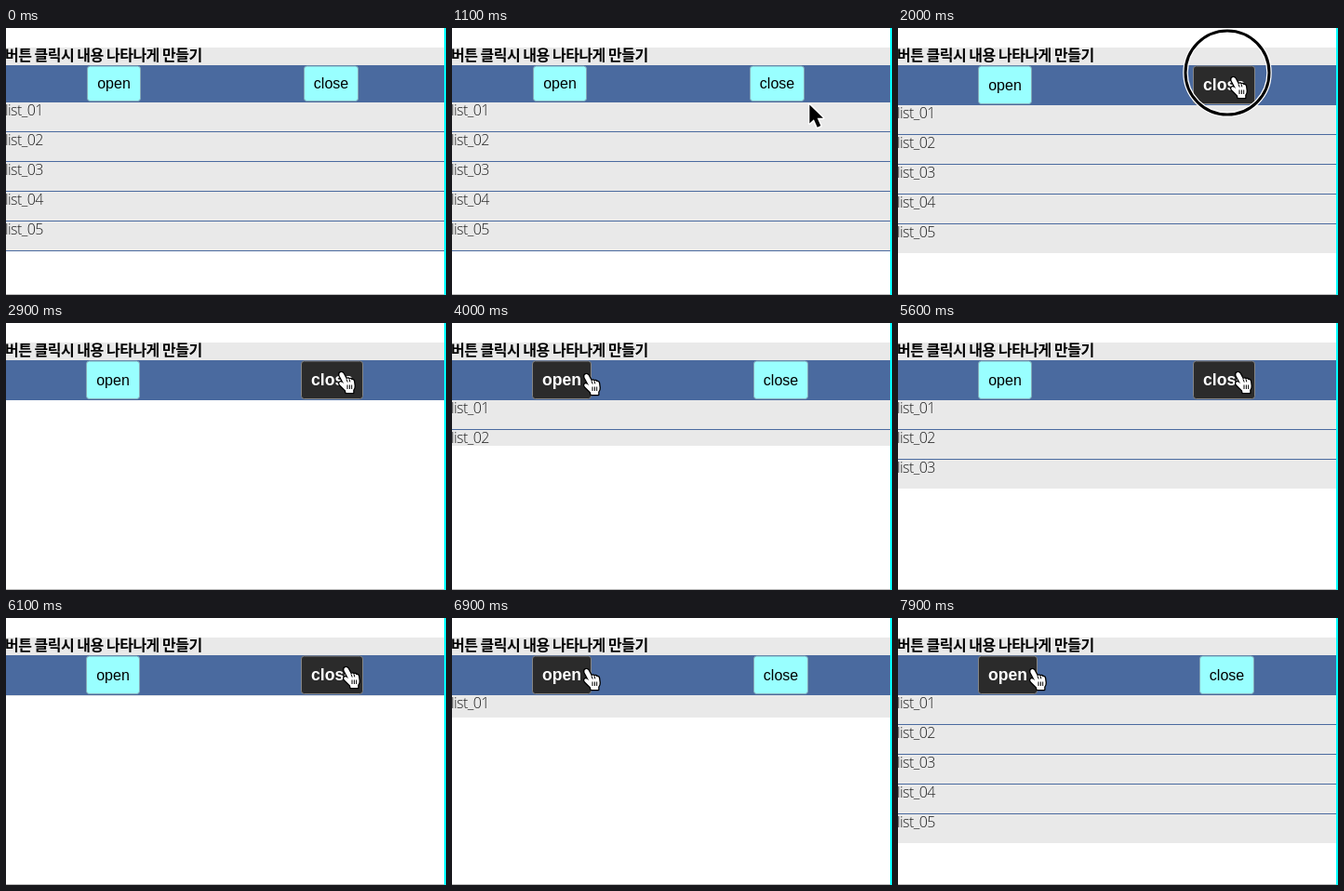
An HTML page with a canvas that plays this animation: 473x287 px, repeating every 9.4 s.

```html
<!DOCTYPE html>
<html lang="ko">
<head>
<meta charset="utf-8">
<style>
html, body { margin: 0; overflow: hidden; background: #fff; }
canvas { display: block; }
</style>
</head>
<body>
<canvas id="stage" width="473" height="287"></canvas>
<script>
const ctx = document.getElementById('stage').getContext('2d');
const LOOP = 9400, STEP = 100, SLIDE = 960;
const GREY = '#e9e9e9', BLUE = '#4a6a9f';

// Pointer positions: [time, x, y]
const path = [
  [100, 455, 183], [200, 440, 150], [640, 440, 150], [1400, 356, 48],
  [1550, 356, 48], [1700, 360, 53], [3150, 360, 53], [3550, 144, 55],
  [4350, 144, 55], [4800, 311, 36], [5080, 364, 52], [5300, 364, 52],
  [5500, 365, 53], [6150, 365, 53], [6600, 144, 55]
];
// List slides: [start, target height]
const slides = [[1965, 0], [3640, 159], [5181, 0], [6657, 159]];
const clickRings = [2000, 5200, 6700];

const arrow = new Path2D('M0 0V20L4.6 15.8L8.4 24.2L12 22.6L8.3 14.4H14.6Z');
const hand = new Path2D('M1.5 4.5Q.8 2 2.6 1.2Q4.6 .4 5.8 2.6L9 8.4Q10.4 6.8 12 8.4Q13.6 7.4 14.6 9.2Q16.8 8.6 17 11L17.6 15.5Q17.8 18 16.2 20V23H8.6L8 20.4L2 14.6Q.2 12 2.6 11.2Q4 11 6.2 13.2Z');
const knuckles = new Path2D('M10 14.5V19M12.4 14.5V19M14.7 14.5V19M9 8.4L10.2 11.6M12 8.4L12.8 11.4');

const swing = p => 0.5 - Math.cos(Math.PI * Math.min(1, Math.max(0, p))) / 2;

function pointerAt(t) {
  if (t < path[0][0]) return null;
  const next = path.findIndex(key => key[0] > t);
  if (next < 0) return path[path.length - 1].slice(1);
  const [t0, x0, y0] = path[next - 1], [t1, x1, y1] = path[next];
  const k = swing((t - t0) / (t1 - t0));
  return [x0 + (x1 - x0) * k, y0 + (y1 - y0) * k];
}

function listHeight(t) {
  let height = 160;
  for (const [start, target] of slides) height += (target - height) * swing((t - start) / SLIDE);
  return Math.round(height);
}

function rect(x, y, w, h, fill) {
  ctx.fillStyle = fill;
  ctx.fillRect(x, y, w, h);
}

function text(str, x, y, font, fill, spacing = 0) {
  ctx.font = font;
  ctx.letterSpacing = spacing + 'px';
  ctx.fillStyle = fill;
  ctx.fillText(str, x, y);
}

function button(label, x, width, height, active) {
  ctx.beginPath();
  ctx.roundRect(x + 0.5, 41.5 - 0.5, width - 1, height - 2.5, 3);
  ctx.fillStyle = active ? '#2b2b2b' : '#9ff';
  ctx.fill();
  ctx.strokeStyle = active ? '#858585' : '#84a9b8';
  ctx.lineWidth = 1;
  ctx.stroke();
  const font = (active ? 'bold 17.6px' : '16px') + ' "Liberation Sans", Arial, sans-serif';
  ctx.textAlign = 'center';
  text(label, x + width / 2, height > 40 ? 67 : 65, font, active ? '#fff' : '#000');
  ctx.textAlign = 'left';
}

function list(top, height) {
  ctx.save();
  ctx.beginPath();
  ctx.rect(0, top, 473, height);
  ctx.clip();
  for (let i = 0; i < 5; i++) {
    const y = top + i * 32;
    rect(0, y, 473, 31, GREY);
    rect(0, y + 31, 473, 1, BLUE);
    text('list_0' + (i + 1), -1, y + 14, '300 16px "Open Sans", sans-serif', '#222', -0.6);
  }
  ctx.restore();
}

function outline(shape, color, width) {
  ctx.strokeStyle = color;
  ctx.lineWidth = width;
  ctx.stroke(shape);
}

function pointer(x, y, overButton) {
  ctx.save();
  ctx.lineJoin = 'round';
  ctx.translate(x, y);
  if (overButton) {
    ctx.translate(-3, -1);
    outline(hand, '#000', 2.6);
    ctx.fillStyle = '#fff';
    ctx.fill(hand);
    outline(knuckles, '#000', 1);
  } else {
    outline(arrow, '#fff', 3);
    ctx.fillStyle = '#000';
    ctx.fill(arrow);
  }
  ctx.restore();
}

function ring(x, y) {
  const circle = new Path2D();
  circle.arc(x, y, 45, 0, 7);
  outline(circle, '#fff', 5.5);
  outline(circle, '#000', 3);
}

function draw(t) {
  const at = pointerAt(t);
  const over = (left, right) => at && at[1] > 40 && at[1] < 82 && at[0] > left && at[0] < right;
  const onOpen = over(87, 150), onClose = over(318, 383);
  const active = onOpen || onClose;
  const navHeight = active ? 43 : 40;

  rect(0, 0, 473, 287, '#fff');
  rect(0, 21, 473, 19, GREY);
  text('버튼 클릭시 내용 나타나게 만들기', -1, 35, 'bold 16px "Noto Sans CJK KR", "Noto Sans CJK", sans-serif', '#000', -0.5);
  rect(0, 40, 473, navHeight, BLUE);
  button('open', active ? 86 : 87, onOpen ? 64 : 58, navHeight, onOpen);
  button('close', onOpen ? 324 : onClose ? 317 : 320, onClose ? 67 : 59, navHeight, onClose);
  list(40 + navHeight, listHeight(t));
  rect(0, 286, 473, 1, '#bbb');
  rect(471, 0, 2, 287, '#0ff');

  if (!at) return;
  if (clickRings.includes(t)) ring(at[0] - 6, at[1] - 5);
  pointer(...at, active);
}

function tick() {
  draw(Math.floor(performance.now() % LOOP / STEP) * STEP);
  requestAnimationFrame(tick);
}
tick();
</script>
</body>
</html>
```
